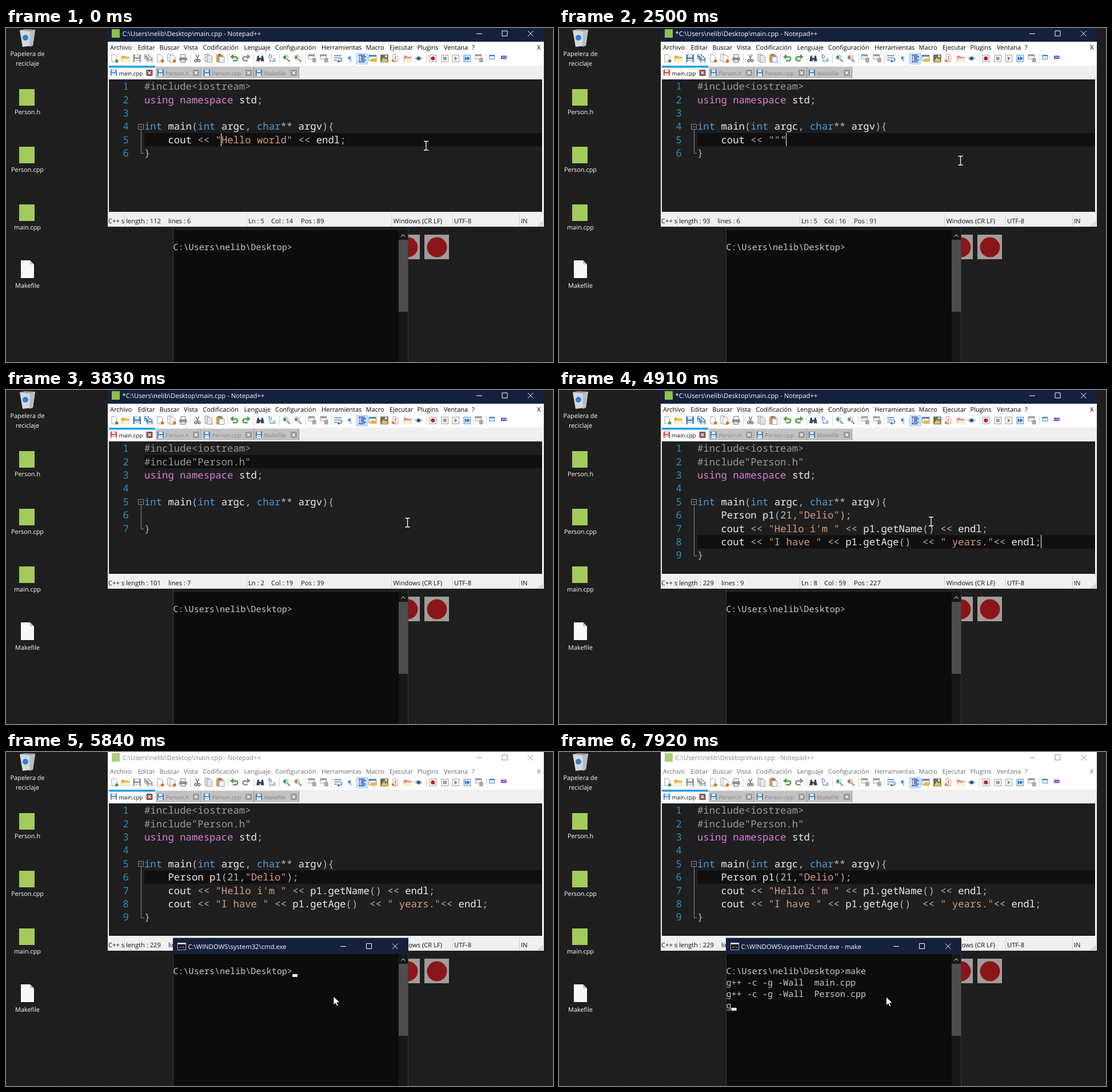
Write an HTML page that moves like this. It is 957 px wide and 585 px high and loops after 8000 ms.

```html
<!DOCTYPE html>
<html lang="es">
<head>
<meta charset="utf-8">
<title>Editor and console</title>
<style>
html, body { margin: 0; width: 100%; height: 100%; overflow: hidden; background: #1f1e1e; }
svg { display: block; }
text { font-family: "Open Sans", "Noto Sans", sans-serif; text-rendering: geometricPrecision; white-space: pre; }
.code { font: 17.28px "Noto Sans Mono", monospace; }
.term { font: 15.12px "Noto Sans Mono", monospace; fill: #ccc; }
.desk { font-size: 10.9px; fill: #fff; text-anchor: middle; }
.menu { font-size: 11px; }
.title { font-size: 11.27px; }
.tab { font-size: 9.7px; }
.status { font-size: 11.2px; fill: #111; }
</style>
</head>
<body>
<svg id="stage" width="957" height="585" viewBox="0 0 957 585"></svg>
<script>
const LOOP = 8000;
const USER_DIR = 'C:\\Users\\nelib\\Desktop';
const PROMPT = USER_DIR + '>';

// drawing helpers
const esc = s => s.replace(/&/g, '&amp;').replace(/</g, '&lt;').replace(/>/g, '&gt;');
const rect = (x, y, w, h, fill, more = '') => `<rect x="${x}" y="${y}" width="${w}" height="${h}" fill="${fill}" ${more}/>`;
const disc = (x, y, r, fill, more = '') => `<circle cx="${x}" cy="${y}" r="${r}" fill="${fill}" ${more}/>`;
const shape = (d, fill) => `<path d="${d}" fill="${fill}"/>`;
const line = (d, color, w = 1) => `<path d="${d}" fill="none" stroke="${color}" stroke-width="${w}"/>`;
const text = (x, y, s, cls, fill = '') => `<text x="${x}" y="${y}" class="${cls}" ${fill && `style="fill:${fill}"`}>${esc(s)}</text>`;
const at = (x, y, body, scale = 1) => `<g transform="translate(${x} ${y}) scale(${scale})">${body}</g>`;

// 16 x 16 icon parts
const page = (x = 3, y = 1, fill = '#fff', edge = '#9a9a9a') =>
  `<path d="M${x} ${y}h6l3 3v10h-9z" fill="${fill}" stroke="${edge}"/>`;
const floppy = color => rect(1, 1, 14, 14, color, 'rx="1"') + rect(4, 1.5, 8, 5, '#e8eef4') + rect(3.5, 9, 9, 6, '#fff') + rect(5, 11, 6, 1, color);
const floppies = color => at(0, 0, floppy(color), .62) + at(3, 3, floppy(color), .62) + at(5.5, 5.5, floppy(color), .66);
const lens = color => line('M9 9l5 5', '#777', 2) + disc(6.5, 6, 4.2, '#dcebf7', 'stroke="#8aa5bd"') + disc(5, 6, 2.6, color);
const turn = color => line('M3 5h7a3.5 3.5 0 0 1 0 7H5', color, 2.6) + shape('M6 0v10L0 5z', color);
const flip = body => `<g transform="translate(16 0) scale(-1 1)">${body}</g>`;
const panes = rect(1, 1, 11, 8, '#fff', 'stroke="#999"') + rect(1, 1, 11, 3, '#999') + rect(8, 7, 7, 8, '#a8a8a8');
const button = body => rect(2, 2, 12, 12, '#fafafa', 'stroke="#999"') + body;
const folder = color => shape('M1 3h5l2 2h7v9H1z', color) + shape('M3 8h13l-2 6H1z', '#fff4c8');

const toolbar = [
  [190, page() + disc(12, 12.5, 2.8, '#3f9b3f')],
  [209, folder('#e9a93a')],
  [270, page() + disc(12, 12.5, 2.8, '#e0691f')],
  [290, page(1, 0) + page(5, 2) + disc(13, 12.5, 2.8, '#e0691f')],
  [310, rect(4, 1, 8, 6, '#fff', 'stroke="#778"') + rect(1, 6, 14, 6, '#8b919c', 'rx="1"') + rect(4, 10, 8, 5, '#dfe9f6', 'stroke="#778"')],
  [335, line('M5 1l4 9M11 1L7 10', '#777', 1.6) + disc(5, 12, 2, 'none', 'stroke="#666" stroke-width="1.6"') + disc(11, 12, 2, 'none', 'stroke="#666" stroke-width="1.6"')],
  [355, page(1, 0, '#e6e6e6') + page(5, 2, '#e6e6e6')],
  [375, rect(1, 1, 12, 14, '#d99a45', 'rx="1"') + rect(4, 0, 6, 3, '#777') + rect(6, 5, 9, 10, '#fff', 'stroke="#6b8fc0"')],
  [400, turn('#4f9d4a')],
  [445, shape('M3 3h3v4h4V3h3l2 10H9v-3H7v3H1z', '#3c4450')],
  [466, text(1, 8, 'b', 'menu', '#2468b8') + text(8, 14, 'a', 'menu', '#2468b8') + line('M4 9v4h4', '#2468b8')],
  [491, lens('#3f9b3f')],
  [511, lens('#e0691f')],
  [536, panes],
  [557, at(0, 0, panes)],
  [581, line('M1 3h13M1 7h11a2.5 2.5 0 0 1 0 6H9M1 11h5', '#4a78b8', 1.5) + shape('M10 10v6l-4-3z', '#4a78b8')],
  [602, text(4, 13, '¶', 'menu', '#2a7fd0')],
  [623, rect(-2, -1, 20, 19, '#cce8ff', 'stroke="#9acbf0"') + line('M2 2h11M6 5h9M6 8h6M6 11h9M2 14h11', '#1d3fc0', 1.7) + line('M3.5 3v11', '#d33', 1)],
  [642, rect(1, 2, 13, 10, '#fff', 'stroke="#5c87bb"') + rect(1, 2, 13, 3, '#5c87bb') + rect(4, 8, 11, 6, '#f0b63c')],
  [662, rect(1, 1, 14, 14, '#6d6d58') + shape('M2 14l5-8 3 4 2-3 2 7z', '#e4c75c') + disc(11, 4, 2, '#e9f0f8')],
  [682, page(3, 1, '#fff', '#c98') + text(4, 12, 'ƒ', 'menu', '#d03a2a') + rect(1, 10, 4, 4, '#e27a3a')],
  [703, folder('#e58a98')],
  [722, shape('M0 8q8-8 16 0q-8 7-16 0z', '#c8c8c8') + disc(8, 8, 3.6, '#5584b4') + disc(8, 8, 1.6, '#222')],
  [747, button(disc(8, 8, 3.6, '#c02020'))],
  [768, button(rect(5, 5, 6, 6, '#999'))],
  [787, button(shape('M6 4l5 4-5 4z', '#888'))],
  [807, rect(2, 2, 12, 12, '#d8ebfb', 'stroke="#5a93c8"') + shape('M4 4l4 4-4 4zM8 4l5 4-5 4z', '#2a72b8')],
  [828, panes],
  [851, rect(3, 2, 9, 7, '#fff', 'stroke="#3c7cc8"') + rect(3, 2, 9, 2, '#3c7cc8')],
  [871, rect(3, 3, 10, 6, '#7a3cc0', 'rx="1"') + line('M5 6h1.5M7.5 6h1.5M10 6h1.5', '#fff', 2)],
];
const menus = [[182, 'Archivo'], [230.5, 'Editar'], [268.5, 'Buscar'], [311, 'Vista'], [344.5, 'Codificación'], [416.5, 'Lenguaje'],
  [471, 'Configuración'], [552, 'Herramientas'], [629.5, 'Macro'], [671, 'Ejecutar'], [719.5, 'Plugins'], [766, 'Ventana'], [815, '?'], [929, 'X']];
const tabs = [[262, 80, 'Person.h'], [343, 91, 'Person.cpp'], [434, 79, 'Makefile']];

const appFile = y => rect(23, y - 14, 27, 29, '#a3cb5c');
const controls = (x, y, gap, color) =>
  line(`M${x} ${y + .5}h10M${x + gap} ${y - 4.5}h9v9h-9zM${x + 2 * gap} ${y - 4.5}l9.5 9.5m0-9.5l-9.5 9.5`, color);
const closeBox = (x, color) => rect(x - 5, 73, 11, 11, color, 'rx="1.5"') + line(`M${x - 2} 76l5 5m0-5l-5 5`, '#fff', 1.4);

function desktop() {
  return rect(0, 0, 957, 585, '#1f1e1e') +
    line('M0 584.5h957', '#0a0a0a') + `<path d="M0 584.5h957" stroke="#3a3a3a" stroke-dasharray="3 3"/>` +
    shape('M24 4l27-1-4 28-18 2z', '#d5d9dd') + shape('M24 4l9-2 18 1-8 3z', '#9da3a9') + shape('M42 6l9-3-4 28-6 2z', '#b7bdc3') +
    disc(34, 17, 5, '#2f7fd0') +
    [121, 222, 323].map(appFile).join('') +
    shape('M26 407h16l7 7v24H26z', '#f8f8f8') + shape('M42 407v7h7z', '#c4c4c4') +
    [[49, 'Papelera de'], [65.5, 'reciclaje'], [150.5, 'Person.h'], [252, 'Person.cpp'], [353, 'main.cpp'], [454.5, 'Makefile']]
      .map(([y, s]) => text(37.5, y, s, 'desk')).join('') +
    [681, 732].map(x => rect(x, 362, 43, 43, '#a09d9a') + disc(x + 22, 384, 17.5, '#8a1518')).join('');
}

function editorFrame() {
  return rect(178, 0, 763, 348, '#f0f0f0') + rect(178, 24, 763, 42, '#fff') +
    [322, 387, 433, 478, 524, 569, 735, 840].map(x => rect(x, 45, 1, 17, '#d4d4d4')).join('') +
    toolbar.map(([x, body]) => at(x - 8, 45.5, body, .98)).join('') +
    rect(180, 67, 81, 23, '#fdfdfd') + rect(180, 66, 81, 3.5, '#18a0e8') + text(197.5, 83, 'main.cpp', 'tab', '#111') + closeBox(250.5, '#8d4c4c') +
    tabs.map(([x, w, s]) => rect(x, 68, w, 20, '#c2c2c2') + rect(x + w - 1, 68, 1, 20, '#8c8c8c') +
      at(x + 2, 72, floppy('#4a7fb8'), .8) + text(x + 17.5, 83, s, 'tab', '#858585') + closeBox(x + w - 10, '#989898')).join('') +
    rect(179, 89, 761, 235, '#fff') + rect(180, 90, 758, 232, '#1e1e1e') +
    [207, 421, 674, 781, 898].map(x => rect(x, 326, 1, 21, '#d2d2d2')).join('') +
    `<svg x="178" y="325" width="29" height="23">${text(1, 16.5, 'C++ source file', 'status')}</svg>` +
    text(677.5, 341.5, 'Windows (CR LF)', 'status') + text(784, 341.5, 'UTF-8', 'status') + text(901, 341.5, 'IN', 'status') +
    [[937, 339], [934, 342], [937, 342], [931, 345], [934, 345], [937, 345]].map(([x, y]) => rect(x, y, 2, 2, '#bdbdbd')).join('');
}

// code view
const COL = 10.37, ROW = 23.4, LEFT = 242, TOP = 90.4;
const expand = s => s.replace(/\t/g, '    ');
const rowTop = n => TOP + (n - 1) * ROW;
const TOKENS = [
  [/^#.*/, '#9b9b9b'], [/^"[^"]*"/, '#d69d85'], [/^(using|namespace)\b/, '#d97fd9'],
  [/^(int|char)\b/, '#569cd6'], [/^\d+/, '#b5cea8'], [/^[\w.]+/, '#eeeeee'], [/^[^\w\s"#]+/, '#b8b8b8'], [/^"/, '#d0d0d0'],
];

function codeLine(s, y) {
  let out = '', rest = expand(s), col = 0;
  while (rest) {
    const gap = rest.match(/^\s+/);
    const [re, color] = gap ? [] : TOKENS.find(([r]) => r.test(rest));
    const word = gap ? gap[0] : rest.match(re)[0];
    if (!gap) out += text((LEFT + col * COL).toFixed(2), y, word, 'code', color);
    col += word.length;
    rest = rest.slice(word.length);
  }
  return out;
}

function codeView({ lines, row, ch, caret }) {
  const top = rowTop(row), open = lines.findIndex(s => s.startsWith('int main')) + 1;
  const foldY = Math.round(rowTop(open) + 7), endY = Math.round(rowTop(lines.length) + 12);
  let out = rect(LEFT, top, 696, ROW, '#0f0f0f');
  lines.forEach((s, i) => {
    const y = (rowTop(i + 1) + 17.8).toFixed(1);
    out += text(204.5, y, String(i + 1), 'code', '#2b91af') + codeLine(s, y);
  });
  out += line(`M231.5 ${foldY + .5}h9v9h-9zM233.5 ${foldY + 5}h5M236.5 ${foldY + 10}V${endY + .5}h5`, '#8a8a8a');
  if (caret) out += rect(Math.floor(LEFT + expand(lines[row - 1].slice(0, ch)).length * COL), Math.round(top), 1, 23, '#fff');

  const total = lines.join('\r\n').length;
  const pos = lines.slice(0, row - 1).reduce((n, s) => n + s.length + 2, ch + 1);
  const col = expand(lines[row - 1].slice(0, ch)).length + 1;
  return out + text(210, 341.5, 'length : ' + total, 'status') +
    text(total > 99 ? 284 : 277.5, 341.5, 'lines : ' + lines.length, 'status') +
    text(424, 341.5, 'Ln : ' + row, 'status') + text(464, 341.5, 'Col : ' + col, 'status') +
    text(col > 9 ? 516 : 509.5, 341.5, 'Pos : ' + pos, 'status');
}

function editorState({ dirty, shell }) {
  const ink = shell ? '#8a8a8a' : '#fff';
  return rect(178, 0, 763, 24, shell ? '#fff' : '#14213d') +
    rect(185, 2, 14, 15, '#8fbf4a', shell ? 'opacity=".75"' : '') +
    text(203.5, 14, `${dirty ? '*' : ''}${USER_DIR}\\main.cpp - Notepad++`, 'title', ink) + controls(823, 9.5, 45, ink) +
    menus.map(([x, s]) => text(x, 38, s, 'menu', shell ? '#6d6d6d' : '#000')).join('') +
    at(221.5, 45.5, floppy(dirty ? '#3f78b5' : '#8e8e8e'), .96) + at(241.5, 45.5, floppies(dirty ? '#3f78b5' : '#8e8e8e'), .96) +
    at(412, 45.5, flip(turn(dirty ? '#4f9d4a' : '#8e8e8e')), .98) +
    at(182, 72, floppy(dirty ? '#d9463c' : '#4a8ed0'), .8);
}

const consoleFrame = rect(292, 348, 412, 237, '#3a3a3a') + rect(293, 348, 410, 6, '#1f1f1f') + rect(293, 354, 394, 231, '#0c0c0c') +
  rect(687, 354, 16, 231, '#171717') + rect(687, 371, 16, 126, '#4d4d4d') + line('M691.5 365.5l3.5-3.5 3.5 3.5', '#a0a0a0', 1.3);

function consoleState({ shell, job, out, block }) {
  let s = '';
  if (shell) {
    s += rect(292, 325.5, 412, 28.5, '#14213d') + rect(300.5, 334.5, 14, 12, '#000', 'stroke="#bbb"') + rect(300, 334, 15, 3, '#ddd') +
      line('M303 342h3M307 342h1M309 340l3 4', '#fff') +
      text(318.5, 345, 'C:\\WINDOWS\\system32\\cmd.exe' + job, 'title', '#fff') + controls(585, 340, 45.5, '#fff');
  }
  out.forEach((row, i) => s += text(292.4, (389.4 + i * 19.7).toFixed(1), row, 'term'));
  if (block) {
    const last = out.length - 1;
    s += rect((292.4 + out[last].length * 9.072).toFixed(1), Math.round(388.5 + last * 19.7), 9, 5, '#f2f2f2');
  }
  return s;
}

function pointer({ mouse: [x, y], arrow }) {
  if (!arrow) return line(`M${x - 4} ${y - 7.5}h3l1 1 1-1h3M${x} ${y - 6.5}v14M${x - 4} ${y + 8}h3l1-1 1 1h3`, '#fff', 1.3);
  return `<path transform="translate(${x} ${y})" d="M0 0v15l3.5-3.3 2.4 5.4 2.5-1.1-2.4-5.2h4.8z" fill="#fff" stroke="#000" stroke-width=".8"/>`;
}

// timeline: each step overrides part of the state
const head = '#include<iostream>', own = '#include"Person.h"';
const program = (body, ...extra) => [head, ...extra, 'using namespace std;', '', 'int main(int argc, char** argv){', ...body, '}'];
const start = '\tcout << "';
const edit = (tail, typed = '') => ({ lines: program([start + typed + tail]), row: 5, ch: (start + typed).length, caret: 1, dirty: 1 });
const typing = s => ({ lines: program([s]), ch: s.length, caret: 1 });
const full = program(['\tPerson p1(21,"Delio");', '\tcout << "Hello i\'m " << p1.getName() << endl;',
  '\tcout << "I have " << p1.getAge()  << " years."<< endl;'], own);
const move = (x, y) => ({ mouse: [x, y] });
const term = (...out) => ({ out, block: 1 });
const compile = 'g++ -c -g -Wall  ';

const steps = [
  [0, { ...edit('Hello world" << endl;'), dirty: 0, shell: 0, job: '', out: [PROMPT], block: 0, mouse: [735, 206], arrow: 0 }],
  [180, { caret: 0 }],
  [800, { caret: 1 }],
  [1030, move(727, 212)], [1100, move(711, 225)], [1180, move(702.5, 232)],
  [1350, edit('o world" << endl;')],
  [1410, edit('rld" << endl;')],
  [1960, { ...edit('"" << endl;'), caret: 0 }],
  [2270, typing(start + '"" << ')],
  [2420, typing(start + '"" <')],
  [2500, typing(start + '""')],
  [2560, typing(start + '"')],
  [2640, { ...typing('\tcout << '), caret: 0 }],
  [2810, { ...typing('\t'), caret: 0 }],
  [3040, { ...typing(''), caret: 0 }],
  [3190, { caret: 1 }],
  [3360, { lines: program([''], ''), row: 2, ch: 0, caret: 0 }],
  [3660, { lines: program([''], own), ch: own.length, caret: 1 }],
  [3830, { caret: 0 }],
  [4060, { lines: full, row: 8, ch: full[7].length }],
  [4360, { caret: 1 }],
  [4760, move(694, 232)], [4830, move(674, 231)], [4910, move(651, 230)], [4990, move(618, 224)],
  [5050, { ...move(600, 221), row: 6, ch: full[5].length }],
  [5380, { dirty: 0 }],
  [5450, move(599, 238)], [5530, move(592, 290)],
  [5610, { ...move(582, 362), arrow: 1 }],
  [5680, { ...move(575, 412), caret: 0 }],
  [5760, move(573, 427)],
  [5840, { ...move(573, 428), shell: 1, block: 1 }],
  [5910, move(572.5, 429)],
  [6390, { block: 0 }],
  [6850, term(PROMPT + 'm')], [6920, term(PROMPT + 'ma')], [7000, term(PROMPT + 'mak')], [7150, term(PROMPT + 'make')],
  [7300, { ...term(PROMPT + 'make', ''), job: ' - make' }],
  [7380, term(PROMPT + 'make', compile + 'main.cpp', '')],
  [7690, term(PROMPT + 'make', compile + 'main.cpp', compile + 'Person.cpp', '')],
  [7920, term(PROMPT + 'make', compile + 'main.cpp', compile + 'Person.cpp', 'g')],
];

const stage = document.getElementById('stage');
stage.innerHTML = desktop() + editorFrame() + consoleFrame + '<g id="live"></g>';
const live = document.getElementById('live');
let shown = 0;

function draw(t) {
  const count = steps.filter(([from]) => from <= t).length;
  if (count === shown) return;
  shown = count;
  const state = Object.assign({}, ...steps.slice(0, count).map(step => step[1]));
  live.innerHTML = editorState(state) + codeView(state) + consoleState(state) + pointer(state);
}

const begin = performance.now();
function tick() {
  draw((performance.now() - begin) % LOOP);
  requestAnimationFrame(tick);
}
tick();
</script>
</body>
</html>
```
